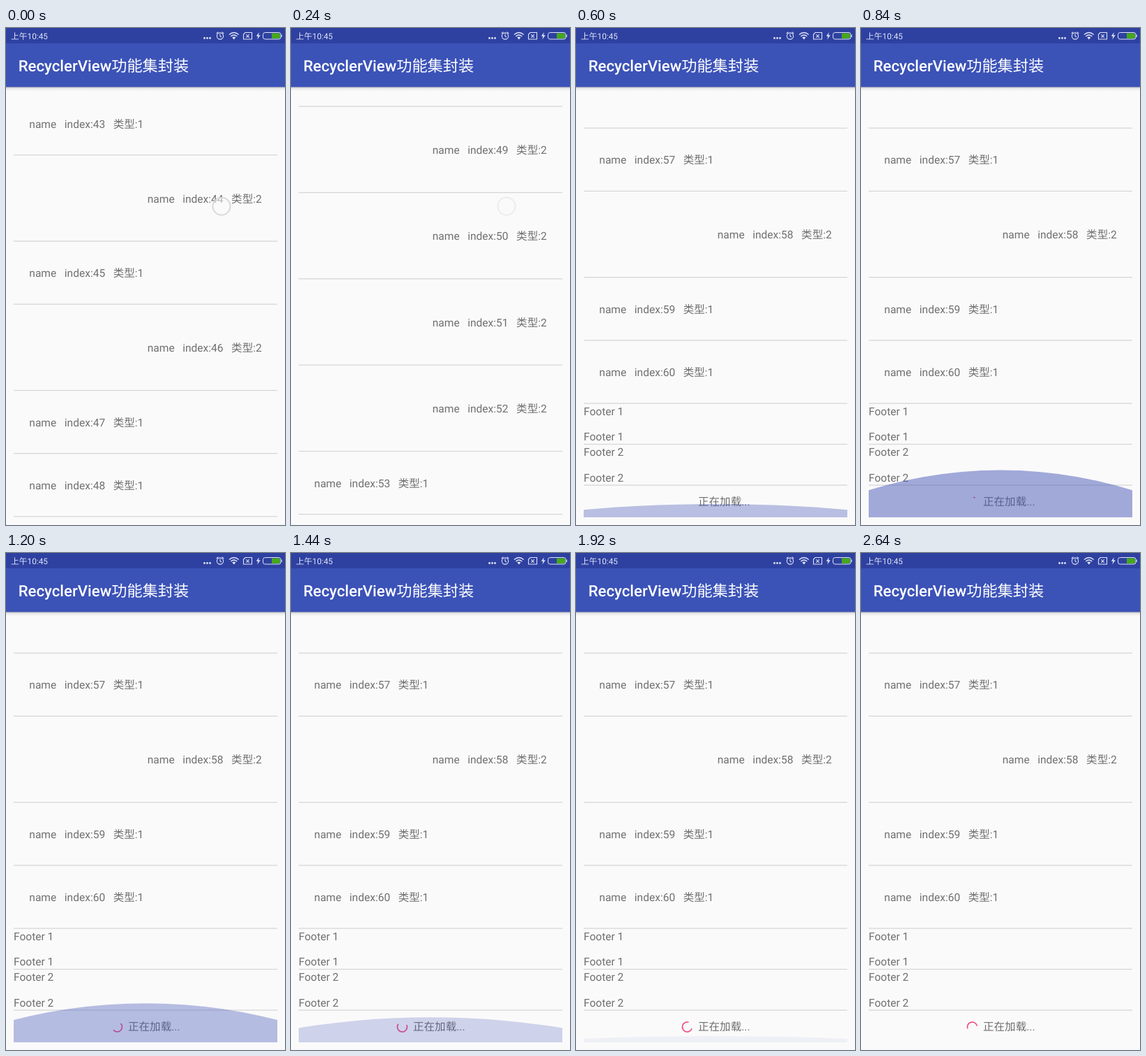
Recreate the animation shown at these times as an HTML page with a canvas. Size 400x711 px, loop 2760 ms.

```html
<!DOCTYPE html>
<html lang="zh">
<head>
<meta charset="utf-8">
<title>RecyclerView</title>
<style>
html, body { margin: 0; width: 100%; height: 100%; overflow: hidden; background: #fafafa; }
canvas { display: block; }
</style>
</head>
<body>
<canvas id="stage" width="400" height="711"></canvas>
<script>
const ctx = document.getElementById('stage').getContext('2d');
const FONT = 'Roboto, "Noto Sans CJK SC", "Noto Sans CJK", sans-serif';
const LOOP = 2760, STEP = 120;
const LEFT = 11, RIGHT = 389, TOP = 95, BOTTOM = 700;
const FIRST_INDEX = 43, ROW_TYPES = '121211222211221211';
const ROW_HEIGHT = { 1: 90.15, 2: 123.35 };
const LIST_END = 537;
// Distance left to scroll at each step of the fling
const FLING = [1476, 1020.5, 889.3, 478.5, 221.5, 0];

const clamp = x => Math.min(1, Math.max(0, x));

// Draws Han and Latin runs one after another, Han in a lighter weight
function text(str, x, y, { size = 15.56, color = '#707070', weight = 400, alignRight = false } = {}) {
  const runs = str.match(/\p{Script=Han}+|\P{Script=Han}+/gu).map(part => {
    const font = `${/\p{Script=Han}/u.test(part) ? 300 : weight} ${size}px ${FONT}`;
    ctx.font = font;
    return { part, font, width: ctx.measureText(part).width };
  });
  if (alignRight) x -= runs.reduce((sum, run) => sum + run.width, 0);
  ctx.fillStyle = color;
  for (const { part, font, width } of runs) {
    ctx.font = font;
    ctx.fillText(part, x, y);
    x += width;
  }
}

function rect(x, y, w, h, color) {
  ctx.fillStyle = color;
  ctx.fillRect(x, y, w, h);
}

function stroke(path, color, width) {
  ctx.strokeStyle = color;
  ctx.lineWidth = width;
  ctx.stroke(path);
}

function circle(x, y, r) {
  const path = new Path2D();
  path.arc(x, y, r, 0, 2 * Math.PI);
  return path;
}

const divider = y => rect(LEFT, y - 0.6, RIGHT - LEFT, 1.2, '#d4d4d4');

function drawRows(scroll) {
  let y = LIST_END + scroll;
  for (let i = ROW_TYPES.length - 1; i >= 0; i--) {
    const type = ROW_TYPES[i];
    const label = `name   index:${FIRST_INDEX + i}   类型:${type}`;
    if (type === '1') text(label, 33.3, y - 39);
    else text(label, 366.7, y - 55.5, { alignRight: true });
    divider(y);
    y -= ROW_HEIGHT[type];
  }
}

function drawFooter(scroll, t) {
  for (const n of [1, 2]) {
    const y = LIST_END + scroll + (n - 1) * 58.5;
    text('Footer ' + n, LEFT, y + 16.9);
    text('Footer ' + n, LEFT, y + 53.2);
    divider(y + 58.5);
  }
  text('正在加载...', 175, 683 + scroll);
  drawSpinner(159.5, 678 + scroll, t);
}

// The head runs ahead first, then the tail catches up
function drawSpinner(x, y, t) {
  const head = 270 * (1 - (1 - clamp((t - 810) / 1200)) ** 3);
  const tail = 270 * clamp((t - 1800) / 1533) ** 2;
  if (head <= tail) return;
  const base = 15 + 0.085 * (t - 840) - 90;
  const arc = new Path2D();
  arc.arc(x, y, 7, (base + tail) * Math.PI / 180, (base + head) * Math.PI / 180);
  stroke(arc, '#f0447f', 1.6);
}

// Overscroll glow: swells on impact, then recedes
function drawGlow(t) {
  const grow = 1 - (1 - clamp((t - 540) / 450)) ** 2;
  const fade = (1 - clamp((t - 1000) / 1400)) ** 2;
  const scale = grow * fade;
  if (scale <= 0) return;
  const radius = 1.5 * (RIGHT - LEFT);
  const height = radius * (1 - Math.cos(Math.PI / 6));
  ctx.fillStyle = `rgba(63, 81, 181, ${(0.3 + 0.2 * grow) * fade})`;
  ctx.beginPath();
  ctx.ellipse(200, BOTTOM + (radius - height) * scale, radius, radius * scale, 0, 0, 2 * Math.PI);
  ctx.fill();
}

function drawTouch(t) {
  ctx.globalAlpha = 0.9 * clamp(1 - t / 400);
  const ring = circle(309, 255, 12.5);
  ctx.fillStyle = 'rgba(250, 250, 252, 0.6)';
  ctx.fill(ring);
  stroke(ring, '#d5d5d9', 2);
  ctx.globalAlpha = 1;
}

function drawStatusIcons() {
  const ink = '#dfe3f5';
  ctx.fillStyle = ink;
  for (const x of [284.5, 288.5, 292.5]) ctx.fill(circle(x, 14.5, 1.4));

  stroke(circle(307, 11.5, 4.6), ink, 1.1);
  stroke(new Path2D('M307 8.5v3.2l2 1.3M301.8 8l2.6-2.4M312.2 8l-2.6-2.4'), ink, 1.1);

  stroke(new Path2D('M320 9.5q6.8-6 13.6 0M322.3 12q4.5-4 9 0'), ink, 1.4);
  ctx.fill(new Path2D('M324.3 13.6q2.5-2 5 0l-2.5 2.8z'));

  stroke(new Path2D('M343 6.5h9.5v9.5h-12v-7zM344.3 9.3l4.4 4.4M348.7 9.3l-4.4 4.4'), ink, 1.1);
  ctx.fill(new Path2D('M362.8 6l-4 5.8h2.6l-1.2 4.6 4.5-6.2h-2.8z'));

  const battery = new Path2D();
  battery.roundRect(368.5, 6.5, 25.5, 9.5, 3);
  stroke(battery, ink, 1);
  ctx.fillStyle = '#45a81c';
  ctx.beginPath();
  ctx.roundRect(381, 7.5, 12, 7.5, [0, 2, 2, 0]);
  ctx.fill();
  rect(394.5, 9.5, 1.2, 3.5, ink);
}

function drawHeader() {
  const shadow = ctx.createLinearGradient(0, 84, 0, 90);
  shadow.addColorStop(0, 'rgba(0, 0, 0, 0.28)');
  shadow.addColorStop(0.4, 'rgba(0, 0, 0, 0.08)');
  shadow.addColorStop(1, 'rgba(0, 0, 0, 0)');
  rect(0, 84, 400, 6, shadow);
  rect(0, 22, 400, 62.4, '#3b52b7');
  rect(0, 0, 400, 22, '#2e41a1');
  text('上午10:45', 7, 15.8, { size: 11.8, color: '#dfe3f5' });
  text('RecyclerView功能集封装', 17.7, 62, { size: 22.2, color: '#fff', weight: 500 });
  drawStatusIcons();
}

function draw(now) {
  const step = Math.floor((now % LOOP) / STEP);
  const t = step * STEP;
  const scroll = FLING[step] || 0;

  rect(0, 0, 400, 711, '#fafafa');
  ctx.save();
  ctx.beginPath();
  ctx.rect(LEFT, TOP, RIGHT - LEFT, BOTTOM - TOP);
  ctx.clip();
  drawRows(scroll);
  drawFooter(scroll, t);
  drawGlow(t);
  ctx.restore();
  drawHeader();
  drawTouch(t);
}

function loop() {
  draw(performance.now());
  requestAnimationFrame(loop);
}
ctx.textRendering = 'geometricPrecision';
loop();
</script>
</body>
</html>
```
